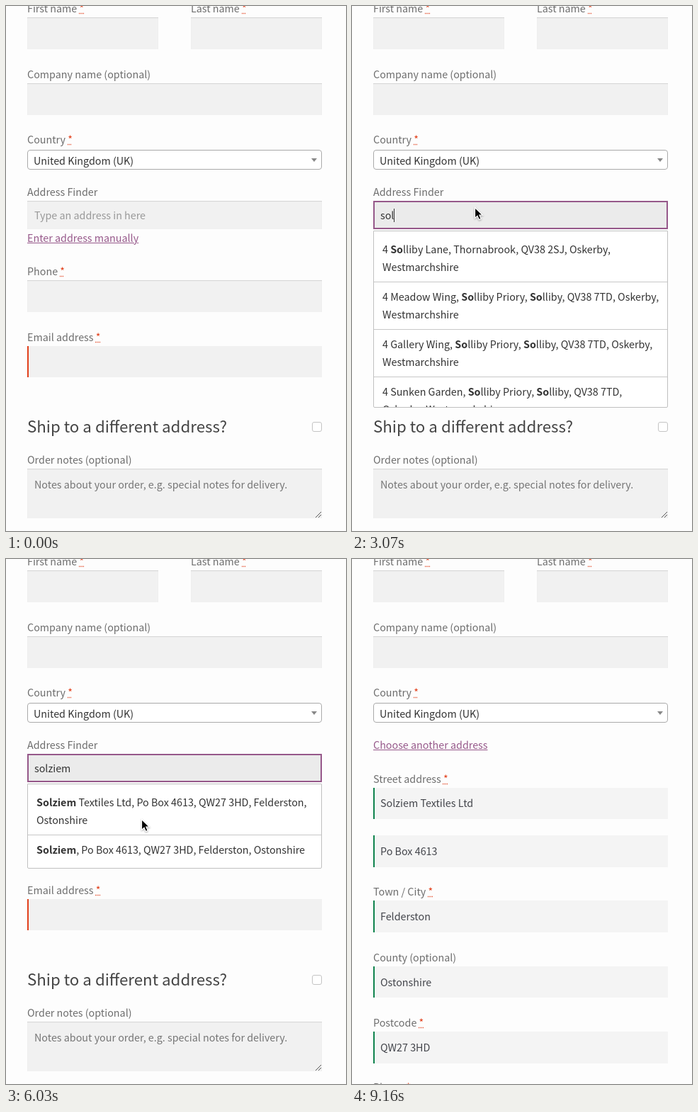
Recreate the animation shown at these times as an HTML page. Size 480 by 741 pixels, loop 9.31 s.

```html
<!DOCTYPE html>
<html lang="en">
<head>
<meta charset="utf-8">
<title>Address finder</title>
<style>
html, body { margin: 0; width: 100%; height: 100%; overflow: hidden; background: #fdfdfd; }
#stage { position: relative; width: 480px; height: 741px; overflow: hidden; color: #6d6d6d;
  font: 14.32px/20px "Noto Sans CJK JP", "Noto Sans CJK SC", "Noto Sans CJK", "Noto Sans", sans-serif; }
#stage span, #stage div, #stage svg { position: absolute; box-sizing: border-box; white-space: pre; }
i { font-style: normal; color: #e2401c; text-decoration: underline dotted; }
.link { color: #96588a; text-decoration: underline; }
.dark { color: #333; }
.value { color: #43454b; }
.hint { color: #999; }
.pale { color: #aaa; }
.note { color: #757575; }
#stage .title { font-size: 22.3px; font-weight: 300; line-height: 12px; color: #444; }
.field { background: #f1f1f1; box-shadow: inset 0 1px 1px rgba(0,0,0,.125); }
.bad { background: #f1f1f1; border-left: 2px solid #e2401c; }
.good { background: #f4f4f4; border-left: 2px solid #0f834d; }
.focus { background: #ebebeb; border: 2px solid #96588a; }
.select { background: #fff; border: 1px solid #aaa; border-radius: 4px; }
.check { background: #fff; border: 1px solid #c4c4c4; border-radius: 3px; }
.caret { display: inline-block; width: 1px; height: 19px; margin-right: -1px; background: #333; vertical-align: -4px; }
#stage .list { left: 30px; top: 317px; width: 416px; max-height: 250px; overflow: hidden; padding: 5px 0;
  background: #fff; border: 1px solid #c0c0c0; border-radius: 0 0 2px 2px; color: #333; line-height: 25px; }
.list p { margin: 0; padding: 7px 12px 9px; }
.list p + p { border-top: 1px solid #c8c8c8; }
.layer { left: 0; top: 0; width: 480px; height: 741px; }
</style>
</head>
<body>
<div id="stage"></div>
<script>
const LOOP = 9310, STEP = 150;
const stage = document.getElementById('stage');

// y is the baseline
const text = (x, y, s, cls = '') => `<span class="${cls}" style="left:${x}px;top:${y - 16}px">${s}</span>`;
const box = (x, y, w, h, cls = 'field') =>
  `<div class="${cls}" style="left:${x}px;top:${y}px;width:${w}px;height:${h}px"></div>`;
const layer = (opacity, s) => `<div class="layer" style="opacity:${opacity}">${s}</div>`;
const svg = (x, y, s) =>
  `<svg style="left:${x}px;top:${y}px;overflow:visible" width="20" height="20">${s}</svg>`;
const star = ' <i>*</i>';

const base =
  text(30, 9, 'First name' + star) + box(30, 16, 185, 45) +
  text(261, 9, 'Last name' + star) + box(261, 16, 185, 45) +
  text(30, 102, 'Company name (optional)') + box(30, 109, 416, 45) +
  text(30, 194, 'Country' + star) + box(30, 203, 416, 28, 'select') +
  text(39, 224, 'United Kingdom (UK)', 'dark') +
  svg(431, 215, '<path d="M0 0H8L4 5Z" fill="#888"/>');

const lower =
  text(30, 380, 'Phone' + star) + box(30, 387, 416, 45) +
  text(30, 473, 'Email address' + star) + box(30, 480, 416, 44, 'bad') +
  text(30, 602, 'Ship to a different address?', 'title') + box(432, 587, 14, 14, 'check') +
  text(30, 646, 'Order notes (optional)') + box(30, 653, 416, 70) +
  text(40, 681, 'Notes about your order, e.g. special notes for delivery.', 'note') +
  svg(436, 713, '<path d="M1 9L9 1M5 9L9 5" stroke="#555" fill="none"/>');

const company = 'Solziem', poBox = 'Po Box 4613', code = 'QW27 3HD', town = 'Felderston', county = 'Ostonshire';
const tail = `${poBox}, ${code}, ${town},`;
const picked = `${company} Textiles Ltd, ${tail} ${county}`;

const filled =
  text(30, 316, 'Street address' + star) + box(30, 323, 416, 44, 'good') + text(40, 350, company + ' Textiles Ltd', 'value') +
  box(30, 390, 416, 45, 'good') + text(40, 418, poBox, 'value') +
  text(30, 475, 'Town / City' + star) + box(30, 482, 416, 45, 'good') + text(40, 510, town, 'value') +
  text(30, 568, 'County (optional)') + box(30, 575, 416, 44, 'good') + text(40, 603, county, 'value') +
  text(30, 660, 'Postcode' + star) + box(30, 667, 416, 45, 'good') + text(40, 695, code, 'value') +
  text(30, 751, 'Phone' + star);

const list = (items, mark) => '<div class="list">' + items.map(s =>
  `<p>${s.replaceAll(mark, `<b>${mark}</b>`)}</p>`).join('') + '</div>';
const region = 'Oskerby,\nWestmarchshire';
const estate = 'Solliby Priory, Solliby, QV38 7TD,';
const places = [
  `4 Solliby Lane, Thornabrook, QV38 2SJ, ${region}`,
  `4 Meadow Wing, ${estate} ${region}`,
  `4 Gallery Wing, ${estate} ${region}`,
  `4 Sunken Garden, ${estate}\nOskerby, Westmarchshire`];
const firms = [
  `${company} Textiles Ltd, ${tail}\n${county}`,
  `${company}, ${tail} ${county}`];

// [time, value] pairs, each held until the next
const at = (keys, t) => keys.reduce((v, [time, value]) => t >= time ? value : v, null);
const typing = [2180, 2620, 3070, 3520, 3960, 4260, 4550];
const lists = [[2770, list(places, 'So')], [3220, list(places, 'Sol')], [4850, list(firms, company)], [6330, '']];
const path = [
  [440, [410, 540]], [590, [290, 450]], [740, [169, 377]],
  [1040, [170, 345]], [1190, [172, 305]], [1340, [173, 284]],
  [5300, [182, 286]], [5450, [183, 300]], [5600, [186, 325]], [5740, [189, 348]], [5890, [191, 362]], [6030, [191, 367]],
  [8280, [197, 374]], [8430, [245, 425]], [8580, [335, 510]], [8720, [412, 600]], [8870, [432, 680]], [9010, [456, 725]],
  [9160, null]];

const swing = (t, start) => {
  const p = Math.min(1, Math.max(0, (t - start) / 400));
  return 0.5 - Math.cos(p * Math.PI) / 2;
};

function cursor(t) {
  const p = at(path, t);
  if (!p) return '';
  if (t >= 5300 && t < 5600)
    return svg(p[0], p[1], '<path d="M-3 -7.5Q0 -7.5 0 -5.5V5.5Q0 7.5 -3 7.5M3 -7.5Q0 -7.5 0 -5.5M3 7.5Q0 7.5 0 5.5M-2 2H2" fill="none" stroke="#111"/>');
  return svg(p[0], p[1], '<path d="M.5 .5V15.5L4 12.3L6.3 17.6L9.2 16.4L6.9 11.2H11.6Z" stroke="#fff" stroke-width="1.2" style="filter:drop-shadow(0 1px 1px #0005)"/>');
}

function finder(t) {
  const typed = company.toLowerCase().slice(0, typing.filter(k => t >= k).length);
  const caret = t < 5000 || (t >= 5450 && t < 6030) || t >= 6330 ? '<b class="caret"></b>' : '';
  let s = text(30, 268, 'Address Finder') + box(30, 275, 416, 40, t < 1440 ? 'field' : 'focus');
  if (t >= 6330)
    s += `<div class="value" style="left:40px;top:280px;width:374px;height:30px;overflow:hidden"><span style="right:1px;top:5px">${picked}${caret}</span></div>`;
  else if (typed) s += text(40, 301, typed + caret, 'dark');
  else s += text(40, 301, 'Type an address in here', t < 2030 ? 'hint' : 'pale');
  return s;
}

function scene(t) {
  const tick = 6330 + Math.floor((t - 6330) / STEP) * STEP;
  const body = t < 6930
    ? layer(1 - swing(tick, 6390), finder(t)) + lower +
      text(30, 333, t < 6330 ? 'Enter address manually' : 'Choose another address', 'link') + (at(lists, t) || '')
    : text(30, 268, 'Choose another address', 'link') + layer(swing(tick, 6830), filled);
  return base + body + cursor(t);
}

let shown;
function draw() {
  const html = scene(performance.now() % LOOP);
  if (html !== shown) stage.innerHTML = shown = html;
  requestAnimationFrame(draw);
}
draw();
</script>
</body>
</html>
```
